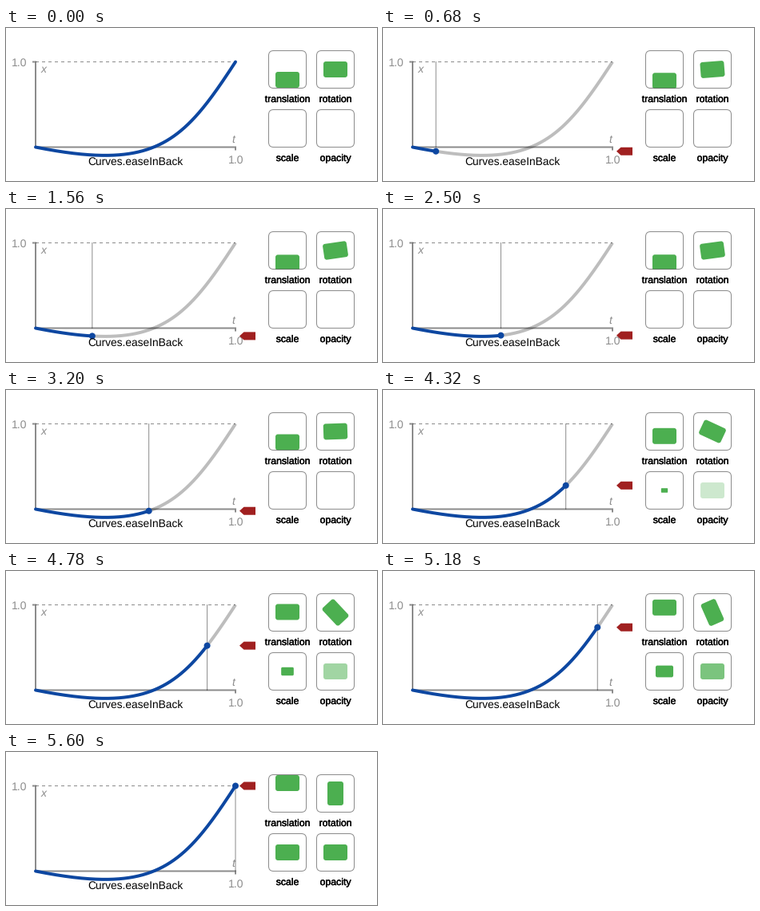
Animation, 464 px wide and 192 px high, one loop 5.62 s. Source, as a matplotlib script:

```python
import numpy as np
import matplotlib.pyplot as plt
from matplotlib import patheffects
from matplotlib.animation import FuncAnimation
from matplotlib.patches import Circle, FancyBboxPatch, Polygon
from matplotlib.transforms import Affine2D

W, H, DPI = 464, 192, 64
PX = 72 / DPI  # points per pixel
TICK_MS, STEPS = 20, 120
TICKS = 281

LEFT, RIGHT, TOP, BOTTOM = 37, 287, 42.5, 149.5
AXIS, TRACK = (0, 0, 0, 0.45), (0, 0, 0, 0.26)
BLUE, GREEN, RED = "#0d47a1", "#4caf50", "#a02020"

plt.rcParams["font.family"] = "Liberation Sans"
plt.rcParams["text.hinting"] = "none"

fig = plt.figure(figsize=(W / DPI, H / DPI), dpi=DPI, facecolor="white")
ax = fig.add_axes([0, 0, 1, 1])
ax.set(xlim=(0, W), ylim=(H, 0))
ax.axis("off")


def bezier(s, a, b):
    return 3 * a * s * (1 - s) ** 2 + 3 * b * s**2 * (1 - s) + s**3


S = np.linspace(0, 1, 400)
CURVE_T = bezier(S, 0.6, 0.735)
CURVE_V = bezier(S, -0.28, 0.045)


def ease_in_back(t):
    return np.interp(t, CURVE_T, CURVE_V)


def to_px(t, v):
    return LEFT + (RIGHT - LEFT) * t, BOTTOM - (BOTTOM - TOP) * v


def line(xs, ys, color, width, z, **kw):
    (artist,) = ax.plot(xs, ys, color=color, lw=width * PX, zorder=z,
                        snap=False, **kw)
    return artist


def label(x, y, text, size, color="black", **kw):
    return ax.text(x, y, text, fontsize=size * PX, color=color,
                   ha="center", va="baseline", zorder=5, **kw)


def round_box(x, y, w, h, r, **kw):
    style = f"round,pad=0,rounding_size={r}"
    return ax.add_patch(FancyBboxPatch((x, y), w, h, boxstyle=style,
                                       snap=False, **kw))


# Graph
line([LEFT, RIGHT], [TOP, TOP], AXIS, 1, 1, dashes=(4, 4),
     dash_capstyle="butt")
line([LEFT - 4, LEFT, LEFT, RIGHT, RIGHT],
     [TOP, TOP, BOTTOM, BOTTOM, BOTTOM + 4], AXIS, 2, 1,
     solid_capstyle="butt", solid_joinstyle="miter")
label(17, 48, "1.0", 14, AXIS)
label(287.3, 170, "1.0", 14, AXIS)
label(47.2, 55.7, "x", 14, AXIS, style="italic")
label(284.5, 144, "t", 14, AXIS, style="italic")
label(162, 172, "Curves.easeInBack", 13.75)

guide = line([], [], AXIS, 1, 2)
rest = line([], [], TRACK, 4, 3, solid_capstyle="butt")
done = line([], [], BLUE, 4, 4, solid_capstyle="round")
dot = ax.add_patch(Circle((0, 0), 4, color=BLUE, lw=0, zorder=4.5))
marker = ax.add_patch(Polygon([(0, 0)], color=RED, lw=0, zorder=6, snap=False))


# Sample tiles
def tile(cx, cy, name):
    frame = round_box(cx - 23.5, cy - 23.5, 47, 47, 6, fc="none", ec=AXIS,
                      lw=PX, zorder=4)
    sprite = round_box(-15, -10, 30, 20, 3, fc=GREEN, ec="none", zorder=3)
    sprite.set_clip_path(frame)
    medium = [patheffects.withStroke(linewidth=0.4 * PX, foreground="black")]
    label(cx, cy + 41, name, 12.3, path_effects=medium)

    def place(dy=0, angle=0, scale=1.0):
        move = Affine2D().scale(scale).rotate_deg(angle).translate(cx, cy + dy)
        sprite.set_transform(move + ax.transData)

    place()
    return sprite, place


_, shift = tile(352, 52, "translation")
_, spin = tile(412, 52, "rotation")
scaled, zoom = tile(352, 126, "scale")
faded, _ = tile(412, 126, "opacity")


def step_at(tick):
    # Three steps per seven ticks; the first of each three is held for five.
    group, r = divmod(tick - 1, 7)
    return 1 + 3 * group + max(0, r - 4)


def draw(tick):
    t = step_at(tick) / STEPS
    v = float(ease_in_back(t))
    running = t > 0
    for part in (guide, rest, dot, marker):
        part.set_visible(running)

    x, y = to_px(t, v)
    past = CURVE_T < t if running else CURVE_T <= 1
    px, py = to_px(CURVE_T, CURVE_V)
    if running:
        done.set_data(np.append(px[past], x), np.append(py[past], y))
        rest.set_data(np.append(x, px[~past]), np.append(y, py[~past]))
    else:
        done.set_data(px, py)
    guide.set_data([x, x], [TOP, BOTTOM])
    dot.center = (x, y)
    marker.set_xy([(292, y), (297.5, y - 5), (312, y - 5),
                   (312, y + 5), (297.5, y + 5)])

    shown = min(max(v, 0), 1)
    shift(dy=13 - 26 * v)
    spin(angle=90 * v)
    zoom(scale=max(shown, 1e-3))
    scaled.set_visible(shown > 0)
    faded.set_alpha(shown)
    return []


anim = FuncAnimation(fig, draw, frames=TICKS, init_func=lambda: draw(0),
                     interval=TICK_MS, repeat=True, repeat_delay=0, blit=False)
plt.show()
```
